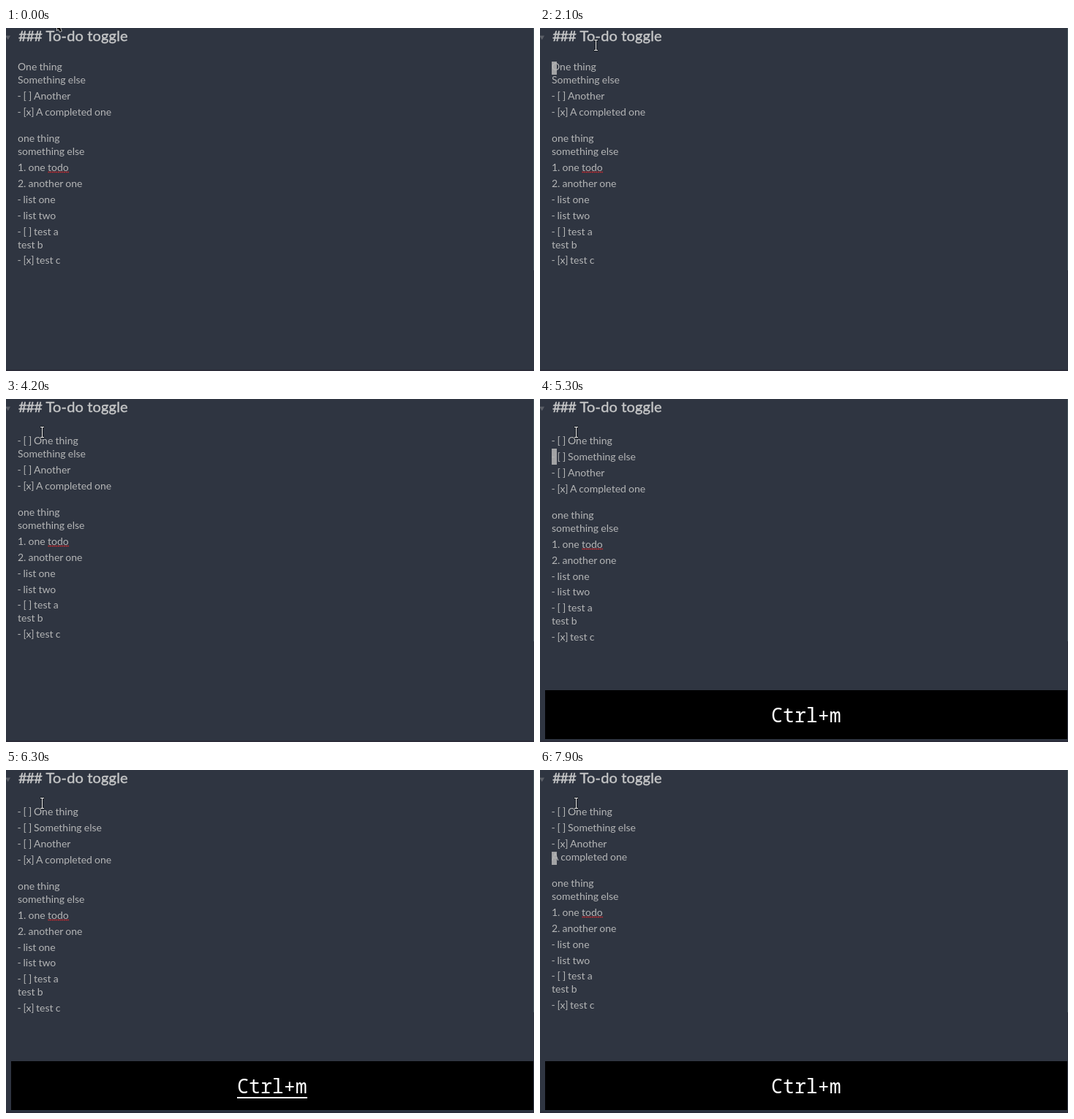
An HTML page that plays this animation: 722x470 px, repeating every 8000 ms.

```html
<!DOCTYPE html>
<html lang="en">
<head>
<meta charset="utf-8">
<title>To-do toggle</title>
<style>
html, body { margin: 0; width: 100%; height: 100%; overflow: hidden; background: #2f3541; }
svg { display: block; width: 722px; height: 470px; }
text { white-space: pre; }
.note { font: 14px Lato, "Open Sans", sans-serif; fill: #b4b5b6; word-spacing: -.4px; }
.head { font: 20px Lato, "Open Sans", sans-serif; fill: #c4c5c6; stroke: #c4c5c6; stroke-width: .45px; }
.key { font: 26.6px "Noto Sans Mono", "DejaVu Sans Mono", monospace; fill: #fff; }
</style>
</head>
<body>
<svg viewBox="0 0 722 470">
  <rect width="722" height="470" fill="#2f3541"/>
  <rect y="468" width="722" height="2" fill="#2b2c39"/>
  <rect x="721" width="1" height="332" fill="#48565d"/>
  <path d="M-1 10.5H6L2.8 16.2Z" fill="#5b5f67"/>
  <text class="head" x="17" y="18" letter-spacing="-1">###</text>
  <text class="head" x="54.5" y="18" letter-spacing=".17">To-do toggle</text>
  <rect id="caret" x="16" width="7" fill="#a2a3a5"/>
  <g id="page"></g>
  <path id="arrow" d="M69.5 -2V4L71.5 1.8L73.4 5.6L76.3 4.3L74.5 -.5Z" fill="#000" stroke="#e8e8e8" stroke-width=".8"/>
  <g id="beam" fill="none">
    <path d="M-3 -7H3M-3 7H3M0 -7V7" stroke="#15181d" stroke-width="2.6"/>
    <path d="M-2.5 -7H2.5M-2.5 7H2.5M0 -7V7" stroke="#f2f2f2"/>
  </g>
  <g id="banner">
    <rect x="7" y="399" width="714" height="67" fill="#000"/>
    <text class="key" x="316" y="443">Ctrl+m</text>
    <rect id="held" x="316" y="448" width="96" height="2" fill="#fff"/>
  </g>
</svg>
<script>
const LOOP = 8000, PLAIN = 18, LIST = 21.87;
const get = id => document.getElementById(id);
const [page, caret, arrow, beam, banner, held] =
  ['page', 'caret', 'arrow', 'beam', 'banner', 'held'].map(get);

const todo = ['One thing', 'Something else', 'Another', 'A completed one'];
const rest = [
  ['', ''], ['', 'one thing'], ['', 'something else'],
  ['1.', 'one'], ['2.', 'another one'],
  ['-', 'list one'], ['-', 'list two'],
  ['[ ]', 'test a'], ['', 'test b'], ['[x]', 'test c']
];
// Markers of the first four lines after each toggle
const docs = [
  ['', '', '[ ]', '[x]'],
  ['[ ]', '', '[ ]', '[x]'],
  ['[ ]', '[ ]', '[ ]', '[x]'],
  ['[ ]', '[ ]', '[x]', '[x]'],
  ['[ ]', '[ ]', '[x]', '']
];
const indent = { '': 16, '-': 23.5, '1.': 30.5, '2.': 30.5, '[ ]': 38, '[x]': 41 };

// key: 0 hidden, 1 shown, 2 held down
const steps = [
  [0, { doc: 0, key: 0, caret: -1, mouse: null }],
  [600, { key: 2 }], [800, { key: 1 }], [1100, { key: 0 }],
  [2100, { caret: 0, mouse: [77, 24] }],
  [2200, { mouse: [70, 31] }], [2300, { mouse: [58, 39] }], [2400, { mouse: [50, 43] }],
  [2600, { caret: -1, mouse: [50, 46] }], [3300, { caret: 0 }],
  [3700, { doc: 1, key: 2 }], [3900, { key: 1 }], [4200, { key: 0, caret: -1 }],
  [4400, { caret: 1 }], [4900, { caret: -1 }],
  [5100, { doc: 2, key: 2, caret: 1 }], [5300, { key: 1 }], [5600, { key: 0, caret: -1 }],
  [5800, { caret: 2 }], [6300, { key: 2, caret: -1 }],
  [6400, { doc: 3, caret: 2 }], [6500, { key: 1 }], [6800, { key: 0 }], [6900, { caret: -1 }],
  [7000, { caret: 3 }], [7600, { key: 2, caret: -1 }],
  [7700, { doc: 4, caret: 3 }], [7900, { key: 1 }]
];

const label = (x, y, s) => `<text class="note" x="${x}" y="${y}">${s}</text>`;

function layout(marks) {
  let mid = 53.45 - PLAIN;
  return [...todo.map((s, i) => [marks[i], s]), ...rest].map(([mark, s]) => {
    mid += mark ? LIST : PLAIN;
    return { mark, s, y: Math.round(mid) };
  });
}

function drawRow({ mark, s, y }) {
  const base = y + 5;
  let out = label(indent[mark], base, s);
  if (mark[0] === '[') out += label(15.5, base, '-') + label(23.5, base, mark);
  else if (mark) out += label(mark === '-' ? 15.5 : 16, base, mark);
  if (mark === '1.') {
    out += label(57, base, 'todo') +
      `<path d="M57.5 ${y + 6.5}H86" stroke="#c52a30" stroke-width="1.3" stroke-dasharray="2 .7"/>`;
  }
  return out;
}

const show = (el, on) => el.setAttribute('visibility', on ? 'inherit' : 'hidden');

function render(state) {
  const rows = layout(docs[state.doc]);
  page.innerHTML = rows.map(drawRow).join('');
  const row = rows[state.caret];
  show(caret, row);
  if (row) {
    caret.setAttribute('y', row.y - (row.mark ? 11 : 7));
    caret.setAttribute('height', row.mark ? 22 : 18);
  }
  show(arrow, !state.mouse);
  show(beam, state.mouse);
  if (state.mouse) beam.setAttribute('transform', `translate(${state.mouse.map(v => v - .5)})`);
  show(banner, state.key);
  show(held, state.key === 2);
}

let last = -1;
function tick() {
  const t = performance.now() % LOOP;
  const count = steps.filter(([at]) => at <= t).length;
  if (count !== last) {
    last = count;
    render(Object.assign({}, ...steps.slice(0, count).map(([, change]) => change)));
  }
  requestAnimationFrame(tick);
}
tick();
</script>
</body>
</html>
```
